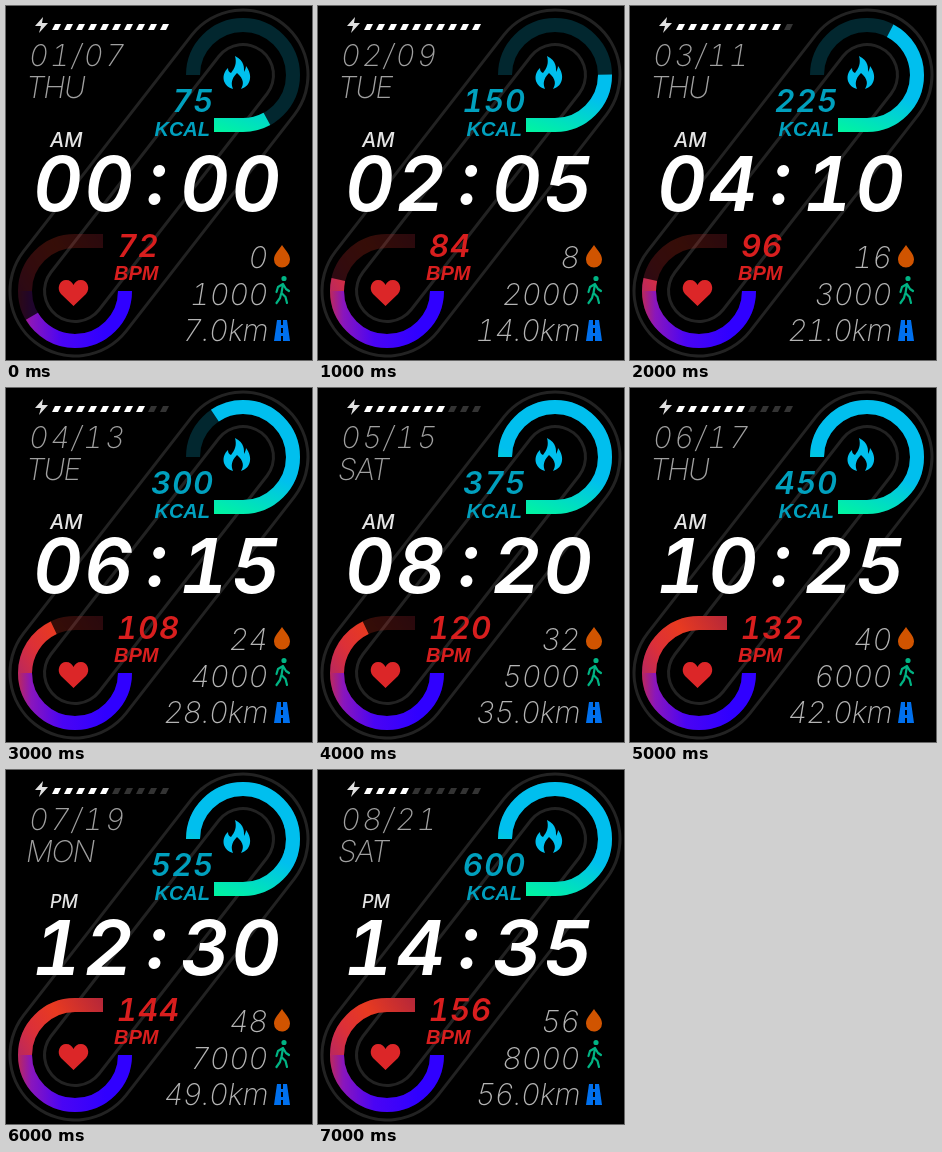
These frames come from a looping animation (306 by 354 pixels, 8000 ms). An HTML page:

```html
<!DOCTYPE html>
<html lang="en">
<head>
<meta charset="utf-8">
<title>Watch face</title>
<style>
  html, body { margin: 0; width: 100%; height: 100%; overflow: hidden; background: #000; }
  svg { display: block; }
  text { font-family: Inter, sans-serif; font-style: italic; font-variant-numeric: tabular-nums; }
  .thin { font-size: 30px; font-weight: 200; fill: #b4b4b4; }
  .date { fill: #a0a0a0; letter-spacing: 2px; }
  .day { fill: #a0a0a0; letter-spacing: -1.5px; }
  .end { text-anchor: end; }
  .time { font-size: 76px; font-weight: 600; fill: #fff; text-anchor: middle; letter-spacing: 2px; }
  .value { font-size: 31px; font-weight: 600; letter-spacing: 1px; }
  .unit { font: italic bold 20px "Liberation Sans", Arial, sans-serif; }
  .cool { fill: #00a0be; }
  .warm { fill: #d81e1e; }
  .half { font-weight: 500; fill: #e4e4e4; }
  .ring { fill: none; stroke-width: 14; }
  .capsule { stroke-linecap: round; }
</style>
</head>
<body>
<svg width="306" height="354" viewBox="0 0 306 354">
  <defs>
    <linearGradient id="mint" gradientUnits="userSpaceOnUse" x1="212" y1="126" x2="230" y2="75">
      <stop stop-color="#00f5a0"/><stop offset="1" stop-color="#00bfee"/>
    </linearGradient>
    <linearGradient id="low" gradientUnits="userSpaceOnUse" x1="100" y1="285" x2="12" y2="285">
      <stop stop-color="#3000ff"/><stop offset=".5" stop-color="#4a04f4"/>
      <stop offset=".85" stop-color="#8a16bc"/><stop offset="1" stop-color="#bc285c"/>
    </linearGradient>
    <linearGradient id="high" gradientUnits="userSpaceOnUse" x1="14" y1="285" x2="97" y2="235">
      <stop stop-color="#bc285c"/><stop offset=".25" stop-color="#dc3038"/>
      <stop offset=".55" stop-color="#e83a20"/><stop offset="1" stop-color="#b82838"/>
    </linearGradient>
    <path id="kcalPath" pathLength="1" d="M208 119H237A50 50 0 1 0 187 69"/>
    <path id="bpmPath" pathLength="1" d="M119 285A50 50 0 1 1 69 235H97"/>
    <mask id="bpmMask" maskUnits="userSpaceOnUse" x="0" y="220" width="140" height="134">
      <use href="#bpmPath" class="ring" stroke="#fff" stroke-opacity=".23" style="color-interpolation:linearRGB"/>
      <use id="bpmRing" href="#bpmPath" class="ring" stroke="#fff"/>
    </mask>
  </defs>
  <rect width="306" height="354"/>

  <g id="capsules"></g>

  <use href="#kcalPath" class="ring" stroke="#02272f"/>
  <use id="kcalRing" href="#kcalPath" class="ring" stroke="url(#mint)"/>
  <g mask="url(#bpmMask)">
    <rect y="285" width="140" height="69" fill="url(#low)"/>
    <rect y="220" width="140" height="65" fill="url(#high)"/>
  </g>

  <path fill="#e0e0e0" d="M37 11L29 20H35L33 27L42 17H36Z"/>
  <g id="battery"></g>

  <!-- flame, heart, drop -->
  <path fill="#00c0ee" d="M229 50C239 55 238 62 238 66C239 64 240 62 240 60C247 69 245 80 235 83C238 78 238 73 231 67C225 73 225 78 227 83C216 80 215 68 222 62C222 65 223 66 225 67C229 62 231 57 229 50Z"/>
  <path fill="#dc2628" d="M67.500 300L55 288C50 282 54 274 60 274C64 274 66 276 67.500 279C69 276 71 274 75 274C81 274 85 282 80 288Z"/>
  <path fill="#d05400" d="M276 239C279 244 284 248 284 253.500A8 8 0 0 1 268 253.500C268 248 273 244 276 239Z"/>

  <!-- walker -->
  <g fill="none" stroke="#00b484" stroke-width="2.200" stroke-linecap="round" stroke-linejoin="round">
    <circle cx="278" cy="272.500" r="1.500" fill="#00b484"/>
    <path d="M270.500 286L272 281L277 278L280 283L283 285M277 278L275.500 287L279.500 291L281 297M275 288L274 292L270.500 297"/>
  </g>

  <!-- road -->
  <path fill="#0070ee" d="M271 314H281L284 335H268Z"/>
  <path stroke="#000" stroke-width="2" stroke-dasharray="5 3" d="M276 314V335"/>

  <text id="date" class="thin date" x="23" y="60"></text>
  <text id="day" class="thin day" x="20" y="92"></text>
  <text id="half" class="half" x="44"></text>
  <text id="hour" class="time" x="78" y="205"></text>
  <text class="time" x="152" y="198">:</text>
  <text id="minute" class="time" x="225" y="205"></text>
  <text id="kcal" class="value cool end" x="208" y="106"></text>
  <text class="unit cool end" x="204" y="130">KCAL</text>
  <text id="bpm" class="value warm" x="111" y="251"></text>
  <text class="unit warm" x="108" y="274">BPM</text>
  <text id="drops" class="thin end" x="262" y="262"></text>
  <text id="steps" class="thin end" x="262" y="299"></text>
  <text id="distance" class="thin end" x="262" y="335" letter-spacing="-.6"></text>
</svg>
<script>
const $ = id => document.getElementById(id);
const pad = n => String(n).padStart(2, "0");
const days = ["THU", "TUE", "THU", "TUE", "SAT", "THU", "MON", "SAT"];
const heartLevels = [.495, .64, .81, 1];

// Each capsule outline is a wide grey line with a slightly narrower black one on top.
$("capsules").innerHTML = [[133, "#222"], [127, "#000"], [64, "#222"], [58, "#000"]].map(([width, color]) =>
  `<path class="capsule" d="M237 69L69 285" stroke="${color}" stroke-width="${width}"/>`).join("");

$("battery").innerHTML = Array.from({ length: 10 }, (_, i) =>
  `<path d="M${46 + 12 * i} 24l3-6h6l-3 6z"/>`).join("");

function setText(values) {
  for (const id in values) $(id).textContent = values[id];
}

function setRing(id, part) {
  $(id).setAttribute("stroke-dasharray", `${part} 2`);
}

function show(n) {
  const count = n + 1, hour = 2 * n, pm = hour >= 12;
  setText({
    date: `${pad(count)}/${pad(7 + 2 * n)}`,
    day: days[n],
    half: pm ? "PM" : "AM",
    hour: pad(hour),
    minute: pad(5 * n),
    kcal: 75 * count,
    bpm: 72 + 12 * n,
    drops: 8 * n,
    steps: 1000 * count,
    distance: `${7 * count}.0km`
  });
  $("half").setAttribute("font-size", pm ? 18 : 20);
  $("half").setAttribute("y", pm ? 138 : 141);
  setRing("kcalRing", Math.min(1, .204 * count));
  setRing("bpmRing", heartLevels[Math.min(3, count >> 1)]);
  [...$("battery").children].forEach((bar, i) =>
    bar.setAttribute("fill", i < 11 - n ? "#fff" : "#333"));
}

let shown = -1;
function tick() {
  const step = Math.floor(performance.now() / 1000) % 8;
  if (step !== shown) show(shown = step);
  requestAnimationFrame(tick);
}
tick();
</script>
</body>
</html>
```
